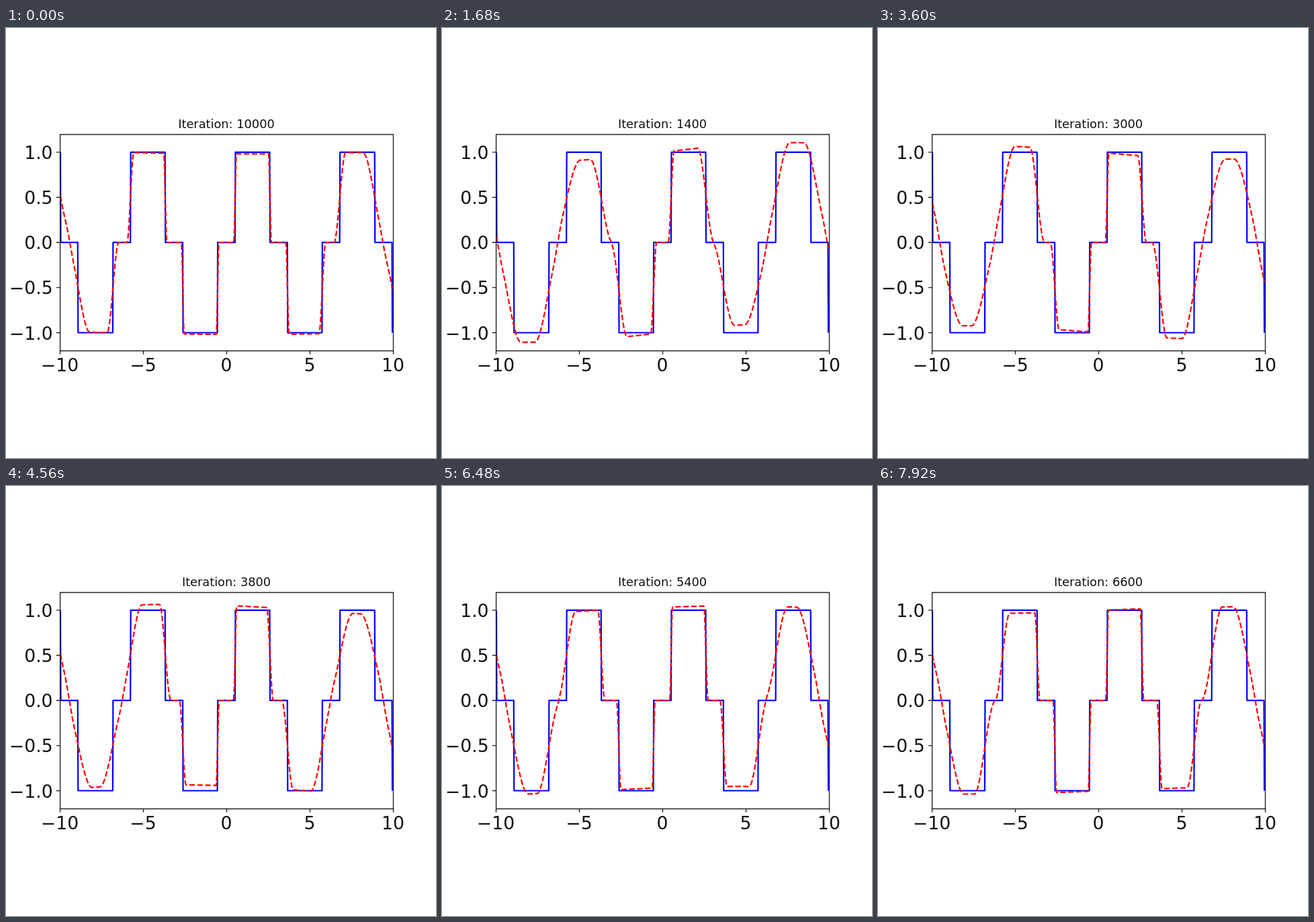
Animation of 640 by 640 pixels, one loop 8000 ms. Source, as an HTML page:

```html
<!DOCTYPE html>
<html lang="en">
<head>
<meta charset="utf-8">
<title>Curve fitting</title>
<style>
  html, body { margin: 0; width: 100%; height: 100%; overflow: hidden; background: #fff; }
  svg { display: block; width: 100%; height: 100%; }
  text { font-family: "DejaVu Sans", sans-serif; font-size: 26.67px; fill: #111; }
  path { fill: none; stroke-linejoin: round; }
  #axes { stroke: #222; stroke-width: 1.4; stroke-linejoin: miter; }
  #wave { stroke: #00f; stroke-width: 2.2; }
  #fit { stroke: #f00; stroke-width: 2.2; stroke-dasharray: 8.22 3.55; }
  #title { font-size: 17.78px; }
</style>
</head>
<body>
<svg viewBox="0 0 640 640">
  <path id="wave"/>
  <path id="fit"/>
  <path id="axes"/>
  <g id="labels"></g>
  <text id="title" x="328" y="149" text-anchor="middle"></text>
</svg>
<script>
const LOOP = 8000, STEP = 240;
const $ = id => document.getElementById(id);
const toX = u => 328 + 24.8 * u;
const toY = v => 319.2 - 134.3 * v;
const clamp = v => Math.min(1, Math.max(0, v));
const sigmoid = v => 1 / (1 + Math.exp(-v));
const smoothstep = v => { v = clamp(v); return v * v * (3 - 2 * v); };
const range = (from, to, step) =>
  Array.from({ length: Math.round((to - from) / step) + 1 }, (_, i) => from + i * step);

const inputs = range(-9.96, 9.96, 0.02);
const plot = f => 'M' + inputs.map(u => toX(u).toFixed(2) + ' ' + toY(f(u)).toFixed(2)).join('L');

// The wave round(sin u) jumps where |sin u| = 1/2
const jumps = range(-3, 3, 1).flatMap(m => [m * Math.PI - Math.PI / 6, m * Math.PI + Math.PI / 6]);

// Training sharpens the jumps from the centre outwards
function fitAt(iteration) {
  const reach = 2.05 * (iteration / 1000) ** 0.56;
  const unseen = 1 - clamp((iteration - 1400) / 2000);
  const swing = 0.14 * Math.exp(-iteration / 5000);
  const phase = 4.1 * Math.log(iteration / 1400);
  const ramps = jumps.map(u => ({
    center: Math.abs(u) > 8 ? u * (1 + 0.05 * unseen) : u,
    width: 0.16 + 1.55 * sigmoid(Math.abs(u) - reach),
    rise: Math.sign(Math.cos(u))
  }));
  return u => {
    const v = ramps.reduce(
      (sum, r) => sum + r.rise * smoothstep((u - r.center) / r.width + 0.5), 1);
    return v + v * v * swing * Math.sin(u / 5 - phase);
  };
}

function label(text, x, y, anchor) {
  const node = document.createElementNS('http://www.w3.org/2000/svg', 'text');
  node.textContent = text.replace('-', '\u2212');
  node.setAttribute('x', x);
  node.setAttribute('y', y);
  node.setAttribute('text-anchor', anchor);
  $('labels').append(node);
}

let axes = 'M80.6 158.5H576.5V480.5H80.6Z';
for (const u of range(-10, 10, 5)) {
  axes += `M${toX(u) + 0.5} 480v5.7`;
  label(String(u), toX(u), 511, 'middle');
}
for (const v of range(-1, 1, 0.5)) {
  axes += `M80 ${toY(v)}h-5.2`;
  label(v.toFixed(1), 69.6, toY(v) + 10, 'end');
}
$('axes').setAttribute('d', axes);
$('wave').setAttribute('d', plot(u => Math.round(Math.sin(u))));

let shown;
function draw(now) {
  const iteration = Math.floor(now % LOOP / STEP) * 200 || 10000;
  if (iteration !== shown) {
    shown = iteration;
    $('title').textContent = 'Iteration: ' + iteration;
    $('fit').setAttribute('d', plot(fitAt(iteration)));
  }
  requestAnimationFrame(draw);
}
draw(performance.now());
</script>
</body>
</html>
```
